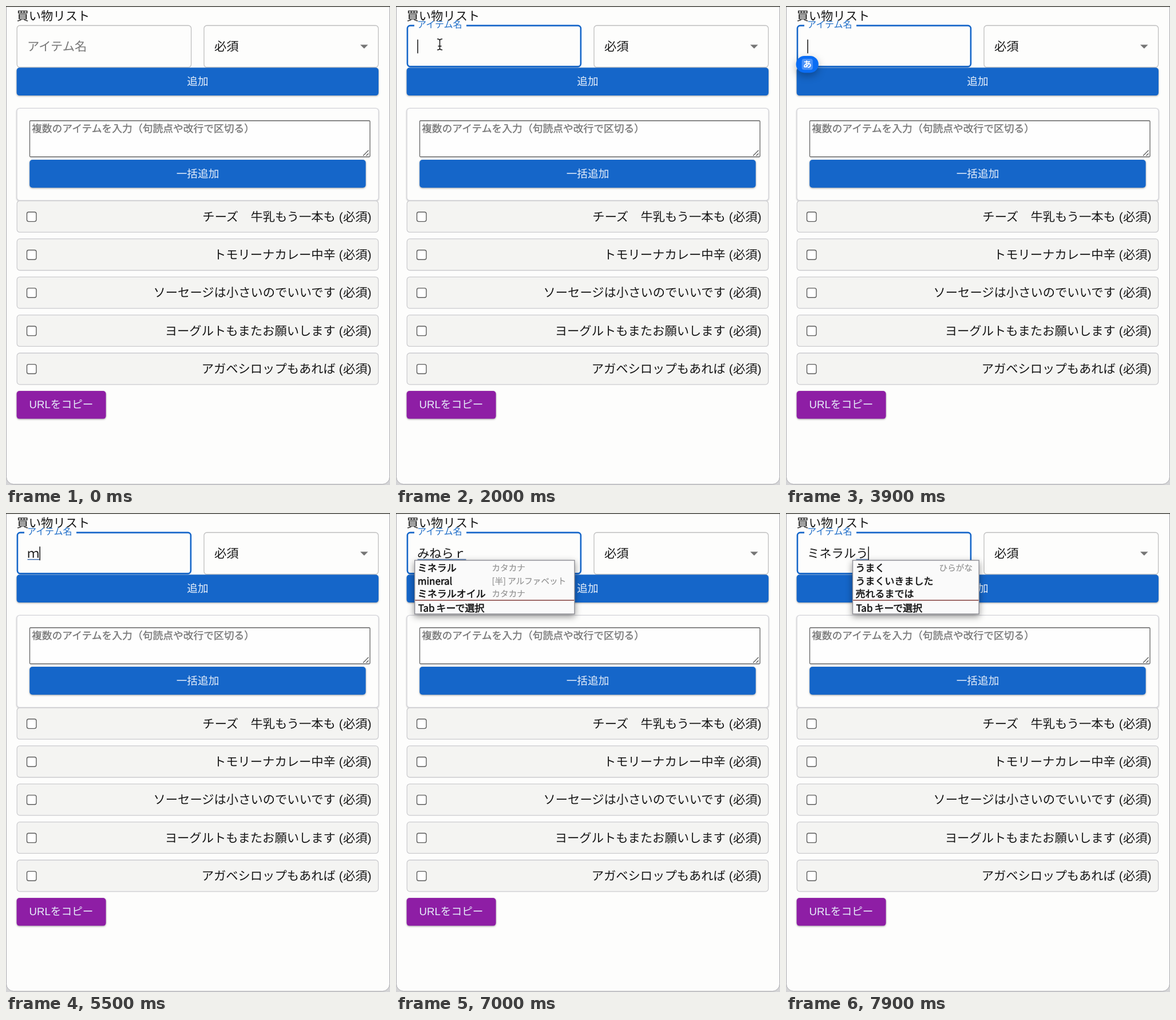
An HTML page for the animation above (8 s loop, 671 by 835 pixels).

```html
<!DOCTYPE html>
<html lang="ja">
<head>
<meta charset="utf-8">
<title>買い物リスト</title>
<style>
html, body { margin: 0; width: 100%; height: 100%; overflow: hidden; background: #d4d4d6; }
svg { display: block; width: 671px; height: 835px; }
text { font: 21.3px "Liberation Sans", "Noto Sans CJK JP", "Noto Sans CJK", sans-serif; fill: #161616; white-space: pre; text-rendering: geometricPrecision; }
.outline { fill: none; stroke: #bfbfbf; stroke-width: 1.3; }
.button { fill: #1566c9; filter: drop-shadow(0 1.8px 1.4px rgba(0,0,0,.36)); }
.caption { font-size: 18.67px; fill: #e6effa; text-anchor: middle; }
.hint { font-size: 17.78px; fill: #757575; stroke: #757575; stroke-width: .35; }
.row { fill: #f4f4f2; stroke: #cccccf; stroke-width: 1.3; }
.check { fill: #fff; stroke: #5c5c5c; stroke-width: 1.4; }
.popup text { font: 17px "Noto Sans CJK JP", "Noto Sans CJK", sans-serif; fill: #111; stroke: #111; stroke-width: .55; }
.popup .note { font-size: 14.6px; fill: #929292; stroke: #929292; stroke-width: .2; }
.panel { fill: #fafafa; stroke: #8d8d95; stroke-width: 1.4; filter: drop-shadow(0 4px 6px rgba(0,0,0,.42)); }
</style>
</head>
<body>
<svg viewBox="0 0 671 835">
  <rect x=".5" y="-20" width="670" height="853.7" rx="13" fill="#fdfdfc" stroke="#a9a9ad"/>
  <rect width="671" height="1.4" fill="#35352f"/>
  <text x="18.5" y="25">買い物リスト</text>

  <rect id="field" class="outline" x="19.2" y="34" width="304.4" height="72.8" rx="5"/>
  <rect id="notch" x="32" y="31" height="7" fill="#fdfdfc"/>
  <text id="label" x="37">アイテム名</text>
  <rect class="outline" x="346" y="34" width="304.6" height="72.8" rx="5"/>
  <text x="364" y="78">必須</text>
  <path d="M619 67.5h13.6l-6.8 6.8z" fill="#757575"/>
  <rect class="button" x="18.6" y="107.5" width="632.4" height="48.6" rx="5"/>
  <text class="caption" x="335" y="138.2">追加</text>

  <rect x="19" y="178.3" width="632" height="160.7" rx="5" fill="#fdfdfc" stroke="#d6d6dc" stroke-width="1.3" style="filter:drop-shadow(0 1.3px 1.2px rgba(0,0,0,.25))"/>
  <rect x="41.5" y="200" width="594.5" height="63" rx="1.5" fill="#fefefe" stroke="#626262" stroke-width="1.3"/>
  <path d="M624 261l9.5-9.5M629.5 261l4-4" stroke="#555" stroke-width="1.2"/>
  <text class="hint" x="45" y="219.5">複数のアイテムを入力（句読点や改行で区切る）</text>
  <rect class="button" x="41.2" y="268" width="587.4" height="48.8" rx="5"/>
  <text class="caption" x="335" y="298.8">一括追加</text>

  <g id="rows"></g>
  <rect class="button" x="18.6" y="671" width="156" height="48.6" rx="5" style="fill:#8e1ea5"/>
  <text class="caption" x="96.5" y="701.2">URLをコピー</text>

  <text id="typed" x="37" y="78"></text>
  <rect id="underline" y="80.4" height="1.4" fill="#3565a8"/>
  <rect id="caret" y="58.5" width="1.5" height="24" fill="#111"/>
  <g id="badge">
    <rect x="-19.6" y="-14.7" width="39.2" height="29.4" rx="14.7" fill="#0a6df4" style="filter:drop-shadow(0 5px 7px rgba(0,0,0,.3))"/>
    <rect x="-9.6" y="-9.6" width="19.2" height="19.2" rx="4" fill="#4b92f8"/>
    <text y="5.7" text-anchor="middle" style="font-size:15px;font-weight:700;fill:#fff">あ</text>
  </g>
  <g id="mineral" class="popup"></g>
  <g id="water" class="popup"></g>
  <path id="arrow" d="M0 0V19.5L4.6 15.3L8 22.6L11.8 20.9L8.5 13.8H14.5Z" fill="#050505" stroke="#fff" stroke-width="1.5" style="filter:drop-shadow(0 2px 1.5px rgba(0,0,0,.35))"/>
  <g id="beam" fill="none" stroke-linecap="round">
    <path id="beamShape" d="M-4 -9.5Q0 -9.5 0 -6.5Q0 -9.5 4 -9.5M0 -6.5V6.5M-4 9.5Q0 9.5 0 6.5Q0 9.5 4 9.5M-2.5 3H2.5"/>
  </g>
</svg>
<script>
const LOOP = 8000, FOCUS = 1600, CHAR = 21.25;
const el = id => document.getElementById(id);
const set = (id, attrs) => { for (const k in attrs) el(id).setAttribute(k, attrs[k]); };
const show = (id, on) => { el(id).style.display = on ? '' : 'none'; };
const clamp = v => Math.max(0, Math.min(1, v));
const progress = (t, from, to) => { const p = clamp((t - from) / (to - from)); return 1 - (1 - p) ** 3; };
const mix = (a, b, p) => a + (b - a) * p;

const items = ['チーズ　牛乳もう一本も', 'トモリーナカレー中辛', 'ソーセージは小さいのでいいです',
  'ヨーグルトもまたお願いします', 'アガベシロップもあれば'];
el('rows').innerHTML = items.map((name, i) => `<g transform="translate(0 ${i * 66.35})">
  <rect class="row" x="19.2" y="339.6" width="631.4" height="54.8" rx="5"/>
  <rect class="check" x="36.5" y="359.2" width="16.4" height="16.4" rx="3"/>
  <text x="638.6" y="374.8" text-anchor="end">${name} (必須)</text></g>`).join('');

// White halo below, dark strokes above
const beamPath = el('beamShape').getAttribute('d');
el('beam').innerHTML = `<path d="${beamPath}" stroke="#fff" stroke-width="3"/>
  <path d="${beamPath}" stroke="#111" stroke-width="1.5"/>`;

function buildPopup(id, x, width, entries, noteAttrs) {
  const lines = entries.map(([word, note], i) => {
    const y = 101.8 + i * 22.7;
    return `<text x="${x + 5}" y="${y}">${word}</text>` +
      (note ? `<text class="note" ${noteAttrs} y="${y - 1}">${note}</text>` : '');
  });
  el(id).innerHTML = `<rect class="panel" x="${x}" y="82.5" width="${width}" height="93.5"/>
    <rect x="${x + .7}" y="151.4" width="${width - 1.4}" height="1.5" fill="#83403c"/>
    ${lines.join('')}<text x="${x + 6}" y="171.5">Tab<tspan dx="3">キーで選択</tspan></text>`;
}
buildPopup('mineral', 32.7, 279.3,
  [['ミネラル', 'カタカナ'], ['mineral', '[半] アルファベット'], ['ミネラルオイル', 'カタカナ']], 'x="167.5"');
buildPopup('water', 116.5, 220.7,
  [['うまく', 'ひらがな'], ['うまくいきました'], ['売れるまでは']], 'x="326" text-anchor="end"');

// [start time, committed text, text being composed]
const keys = [[0, '', ''], [5400, '', 'ｍ'], [5650, '', 'み'], [5900, '', 'みｎ'], [6100, '', 'みね'],
  [6350, '', 'みねｒ'], [6550, '', 'みねら'], [6900, '', 'みねらｒ'], [7150, '', 'みねらる'],
  [7350, '', 'ミネラル'], [7550, 'ミネラル', ''], [7750, 'ミネラル', 'う']];

function draw(t) {
  const focused = t >= FOCUS, lift = progress(t, FOCUS, FOCUS + 200);
  set('field', focused
    ? { x: 19.9, y: 34.1, width: 303, height: 71.5, style: 'stroke:#1566c9;stroke-width:2.6' }
    : { x: 19.2, y: 34, width: 304.4, height: 72.8, style: '' });
  set('notch', { width: 91 * lift });
  set('label', { y: mix(77.5, 38.3, lift),
    style: `font-size:${mix(21.3, 16, lift)}px;fill:${focused ? '#1c6cc8' : '#777'}` });

  const [, done, composing] = keys.findLast(k => t >= k[0]);
  const length = done.length + composing.length;
  el('typed').textContent = done + composing;
  set('underline', { x: 37.5 + done.length * CHAR, width: composing.length * CHAR });
  set('caret', { x: 37.2 + length * CHAR });
  const blinkOn = (t - FOCUS) % 1000 < 500;
  show('caret', focused && (length ? t < 6900 || t >= 7150 : blinkOn));

  const pop = progress(t, 3600, 3800) * (1 - progress(t, 5100, 5300));
  show('badge', pop > 0);
  set('badge', { transform: `translate(37.2 101.7) scale(${mix(.5, 1, pop)})`, opacity: pop });
  show('mineral', t >= 6650 && t < 7350);
  show('water', t >= 7800);

  const enter = progress(t, 800, 1200), glide = progress(t, 1300, 1700);
  show('arrow', t >= 800 && t < 1300);
  set('arrow', { transform: `translate(${mix(215, 121.7, enter)} ${mix(150, 64, enter)})` });
  show('beam', t >= 1300 && t < 3600);
  set('beam', { transform: `translate(${mix(120, 76.5, glide)} ${mix(68, 67, glide)})` });
}

function tick(now) {
  draw(now % LOOP);
  requestAnimationFrame(tick);
}
draw(0);
requestAnimationFrame(tick);
</script>
</body>
</html>
```
